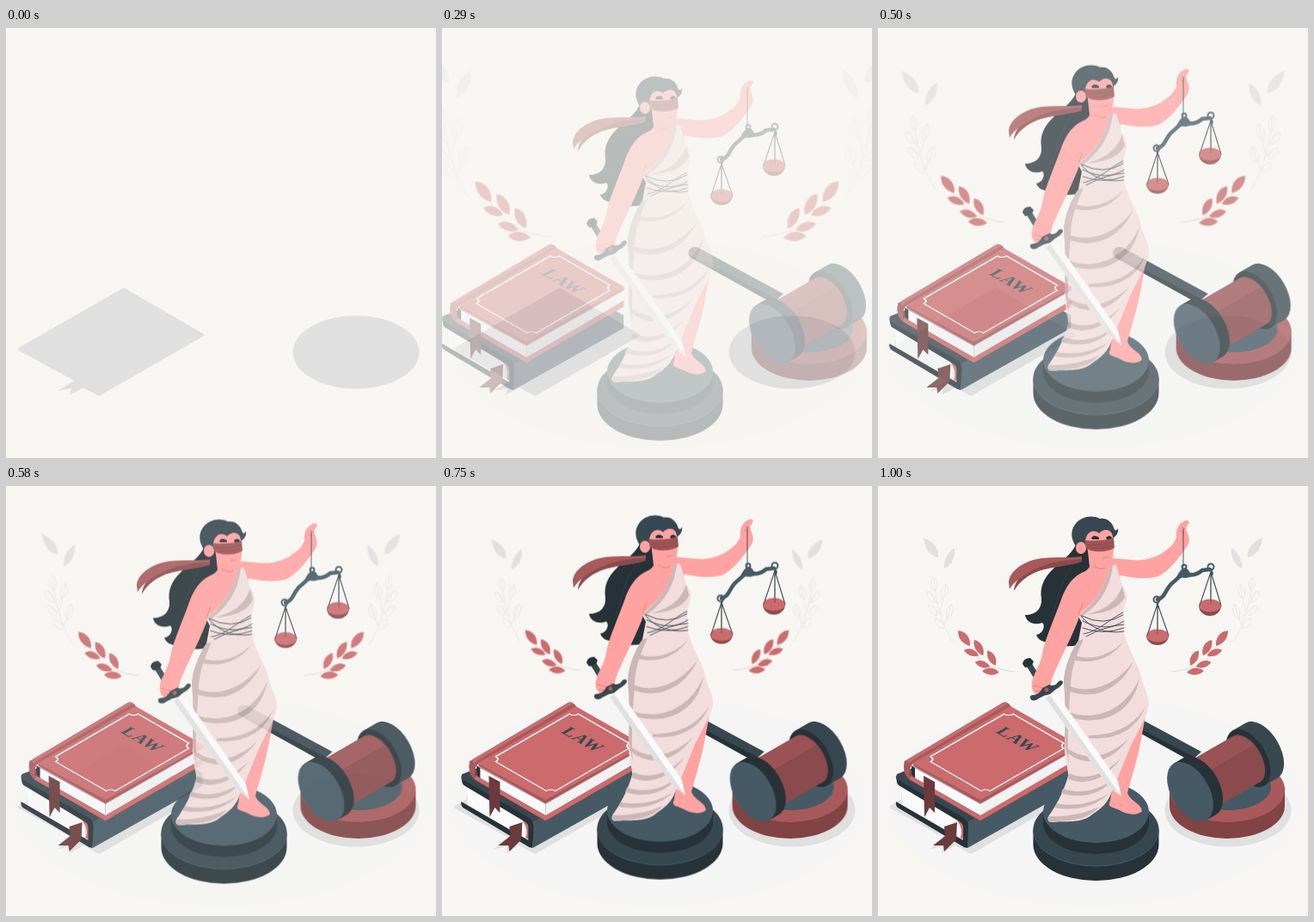
Write an HTML page that moves like this. It is 500 px wide and 500 px high and loops after 1.04 s.

```html
<!DOCTYPE html>
<html lang="en">
<head>
<meta charset="utf-8">
<title>Law and justice</title>
<style>
  html, body { margin: 0; width: 100%; height: 100%; overflow: hidden; background: #f7f6f2; }
  svg { display: block; width: 100vw; height: 100vh; }
  .in {
    animation: enter 1s cubic-bezier(.36, -.01, .5, 1.38) both paused;
    animation-delay: var(--clock, 0s);
  }
  #floor { --from: none; }
  #plants { --from: scale(1.5); transform-origin: 250px 139px; }
  #books { --from: translateX(-30px); }
  #gavel { --from: translateX(30px); }
  #justice { --from: translateY(30px); }
  @keyframes enter {
    from { opacity: 0; transform: var(--from); }
    to { opacity: 1; transform: none; }
  }
  .ink { fill: #263238; }
  .slate { fill: #37474f; }
  .steel { fill: #455a64; }
  .red { fill: #cb6b6d; }
  .brick { fill: #a85a5b; }
  .wine { fill: #8b4a4b; }
  .maroon { fill: #6b3a3c; }
  .skin { fill: #ffa3a2; }
  .dress { fill: #f2dddc; }
  .fold { fill: #cbb7b6; }
  .grey { fill: #e0e0e0; }
  .line { fill: none; stroke: #37474f; stroke-width: .9; stroke-linecap: round; }
  text { font: bold 20px "Liberation Serif", "Noto Serif", serif; letter-spacing: 1px; }
</style>
</head>
<body>
<svg viewBox="0 0 500 500">
  <defs>
    <path id="leaf" d="M-10 0C-5-6 4-6 10 0C4 5-4 5-10 0Z"/>
    <g id="sprig">
      <path class="grey" d="M53 60C63 64 72 73 70 83C60 81 54 72 53 60ZM89 72C90 82 86 92 77 96C76 86 81 77 89 72Z"/>
      <g fill="none" stroke="#e2e2e2" stroke-width=".7">
        <path d="M65 107C67 135 74 160 87 182M60 122L69 137M79 114Q77 130 72 146M62 139L74 151M85 137Q83 150 77 161"/>
        <use href="#leaf" transform="translate(65 114) rotate(82) scale(.85)"/>
        <use href="#leaf" transform="translate(61 129) rotate(55) scale(.75)"/>
        <use href="#leaf" transform="translate(77 123) rotate(105) scale(.9)"/>
        <use href="#leaf" transform="translate(64 145) rotate(50) scale(.75)"/>
        <use href="#leaf" transform="translate(83 146) rotate(106) scale(.9)"/>
        <use href="#leaf" transform="translate(71 160) rotate(50) scale(.75)"/>
      </g>
      <path d="M103 180C110 198 127 213 159 216" fill="none" stroke="#d9d4d2" stroke-width=".8"/>
      <g class="red">
        <use href="#leaf" transform="translate(100 177) rotate(52) scale(1.12)"/>
        <use href="#leaf" transform="translate(117 188) rotate(60) scale(1.05)"/>
        <use href="#leaf" transform="translate(132 200) rotate(62)"/>
        <use href="#leaf" transform="translate(108.500 194) rotate(20) scale(.92)"/>
        <use href="#leaf" transform="translate(121.500 207.500) rotate(18) scale(.92)"/>
        <use href="#leaf" transform="translate(131 216) rotate(4) scale(.98)"/>
      </g>
    </g>
  </defs>

  <ellipse id="floor" class="in" cx="250" cy="367" rx="240" ry="122" fill="#f5f5f5"/>

  <g class="grey">
    <path d="M14.500 372L135 303Q137 302 139 303L230 356Q231 357 230 358L110 427Q108 428 106 427L90 418L74 427L76 419L60 422L79 410L15 375Q13 373 14.500 372Z"/>
    <ellipse cx="407" cy="377" rx="73.500" ry="42.500"/>
  </g>

  <g id="plants" class="in">
    <use href="#sprig"/>
    <use href="#sprig" transform="translate(500) scale(-1 1)"/>
  </g>

  <g id="books" class="in">
    <!-- lower book -->
    <path fill="#e6e6e6" d="M27 342L104 386V412L27 369Z"/>
    <path fill="#fafafa" d="M27 347L95 387V411L29 373Z"/>
    <path class="red" d="M92 389L105 392V414L96 409Q100 399 92 389Z"/>
    <path class="slate" d="M22 335L40 328L217 322V331L105 392L24 346Q19 340 22 335Z"/>
    <path class="steel" d="M104 391L217 326L232 334V349L104 421Z"/>
    <path class="ink" d="M22 341L100 386Q106 390 105 398L104 420L99 418V396Q99 393 96 391L24 348Q21 345 22 341ZM21 367L101 413L104 421L100 420L23 374Q20 371 21 367Z"/>
    <path class="maroon" d="M77 396L92 391L91 411L77 425L76 418L64 418L78 407Z"/>
    <!-- upper book -->
    <path class="wine" d="M31 319Q28 334 36 341L119 390L232 324V317L118 381L43 338Z"/>
    <path class="red" d="M38 337L118 383L232 317V324L119 389L36 341Z"/>
    <path fill="#fafafa" d="M42 325L119 368V383L42 339Z"/>
    <path fill="#f2f2f2" d="M119 368L227 306V320L119 383Z"/>
    <path class="ink" d="M39 325L43 328V340L39 335Z"/>
    <path class="brick" d="M31 320L145 252Q149 250 153 254L155 257L42 322Q35 326 37 341Q28 336 31 320Z"/>
    <path class="red" d="M34 318L146 252Q149 251 151 253L40 319Q37 321 36 323Z"/>
    <path class="red" d="M154 256L231 300Q234 302 231 305L119 369L41 325V322Z"/>
    <path class="wine" d="M41 323L119 365L233 302Q234 304 231 306L119 370L41 327Z" opacity=".55"/>
    <g transform="matrix(.866 .5 -.866 .5 152 262)">
      <path d="M6 0H74Q74 6 80 6V105Q74 105 74 111H6Q6 105 0 105V6Q6 6 6 0Z" fill="none" stroke="#fff" stroke-width="1.500"/>
    </g>
    <text class="slate" transform="matrix(.866 .5 -.866 .5 136 286)">LAW</text>
    <path class="maroon" d="M53 337L66 344V380L60 374L54 385Z"/>
  </g>

  <g id="gavel" class="in">
    <path fill="#814344" d="M339 353V372A67 38 0 0 0 473 372V350Z"/>
    <ellipse class="brick" cx="406" cy="353" rx="67" ry="38"/>
    <ellipse class="steel" cx="408" cy="350" rx="49" ry="27"/>
    <path class="slate" d="M278 256L376 309L364 320L272 269Q264 266 266 259Q270 252 278 256Z"/>
    <path class="ink" d="M267 263L370 316L364 320L272 269Z"/>
    <g transform="translate(363 355.500) rotate(-30)">
      <path class="slate" d="M78-37H96a21 37 0 0 1 0 74H78Z"/>
      <ellipse class="ink" cx="78" rx="21" ry="37"/>
      <path class="wine" d="M16-31H76a17 31 0 0 1 0 62H16Z"/>
      <path fill="#995355" d="M16-31H76Q87-26 91-10H16Z"/>
      <path class="ink" d="M0-38H13a22 38 0 0 1 0 76H0Z"/>
      <ellipse class="steel" rx="22" ry="38"/>
    </g>
  </g>

  <g id="justice" class="in">
    <!-- pedestal -->
    <path class="ink" d="M180.500 400V417A73 42 0 0 0 326.500 417V400Z"/>
    <ellipse class="steel" cx="253.500" cy="401" rx="73" ry="41.500"/>
    <ellipse class="slate" cx="253.500" cy="400" rx="73" ry="41.500"/>
    <path class="ink" d="M192 379V392A61.500 36 0 0 0 315 392V379Z"/>
    <ellipse class="steel" cx="253.500" cy="379" rx="61.500" ry="36"/>

    <!-- hair -->
    <path class="ink" d="M232 60C231 76 215 85 204 96C192 107 188 119 190 131C191 142 184 150 171 150C172 157 180 163 191 159C195 162 192 172 184 173C187 181 196 183 205 181C212 187 228 189 241 181L246 110L250 80Z"/>
    <path class="slate" d="M272 61C277 59 280 54 279 49C277 53 275 52 274 48C271 40 264 37 258 38C248 33 235 36 229 45C223 53 225 63 230 70L244 76Z"/>
    <path class="line" d="M226 94C209 113 212 133 201 151" opacity=".7"/>

    <!-- head, chest and raised arm -->
    <path class="skin" d="M244 76L246 94C241 101 232 104 228 113L232 153L279 118L282 104C297 107 311 109 326 105C339 98 348 86 356 75C361 69 363 64 361 58L358 49L362 42Q360 38 354 42C349 45 346 52 347 60C345 67 338 73 329 79C317 85 308 87 296 86C286 85 274 84 267 84V78Z"/>
    <path class="skin" d="M241 64C242 55 249 49 257 55C264 48 272 51 273 59L274 76C273 85 271 91 265 91C257 91 249 86 245 78Z"/>
    <ellipse class="skin" cx="236" cy="72" rx="6" ry="7"/>
    <path class="ink" d="M248 60Q252 56 257 60V62H249ZM265 60Q269 56 272 60V62H266Z"/>
    <path class="brick" d="M237 82C222 84 206 82 190 84C169 87 153 99 152 112L153 120Q157 113 163 109Q159 114 158 122C165 110 174 104 186 99C204 93 223 93 237 88Z"/>
    <path class="wine" d="M237 85C216 86 190 88 163 109Q159 114 158 122C165 110 174 104 186 99C204 93 223 93 237 88Z"/>
    <path fill="#9e5355" d="M240 63C250 64 264 64 274 60L275 72C266 77 256 77 247 75L242 72Z"/>
    <path d="M244 68Q260 70 274 65M246 72Q260 74 274 69" fill="none" stroke="#8b4a4b" stroke-width=".7"/>
    <path d="M261 83Q265 84 268 82M251 93Q258 98 265 95M351 52L356 55M353 48L358 50" fill="none" stroke="#e87878" stroke-width=".9"/>

    <!-- leg and foot -->
    <path class="skin" d="M312 262L307 289C302 318 295 338 290 357C294 367 306 369 307 378C301 384 289 382 281 377C273 373 266 374 270 366L274 340L278 305Z"/>

    <!-- dress -->
    <path class="dress" d="M269 94L276 91C279 96 281 105 284 116C293 127 288 136 285 147L286 171C292 192 304 211 305 218C308 235 316 242 315 255C313 268 304 282 294 302C286 321 279 340 272 355C267 370 259 375 249 382C237 393 216 389 203 391C196 391 196 386 201 380C212 363 216 353 221 338C222 329 216 318 217 298C218 273 218 245 216 229C216 211 225 191 233 180L237 159L232 150C250 138 264 119 269 94Z"/>
    <g class="fold">
      <path d="M233 180C225 191 216 211 216 229C218 245 218 273 217 298L222 323C219 286 223 252 224 231C225 211 231 196 239 178Z"/>
      <path d="M269 94L273 92C270 119 257 138 238 151L233 151C250 138 264 119 269 94Z"/>
      <path d="M284 116C278 133 266 144 243 149C263 149 281 142 287 129Z"/>
      <path d="M229 197C248 204 272 196 286 180C272 201 249 208 226 202Z"/>
      <path d="M221 232C246 243 276 232 297 204C280 240 247 249 221 238Z"/>
      <path d="M222 263C255 275 290 258 304 223C297 266 256 281 222 268Z"/>
      <path d="M245 290C278 290 300 276 311 256C301 284 275 296 245 293Z"/>
      <path d="M218 303C238 321 268 317 292 293C270 325 238 327 219 309Z"/>
      <path d="M222 334C242 343 262 336 282 317C263 343 240 349 220 340Z"/>
      <path d="M215 352C236 359 258 354 275 339C258 361 234 364 213 357Z"/>
      <path d="M208 369C230 373 250 369 269 357C251 375 227 378 205 374Z"/>
      <path d="M199 384C221 385 242 380 257 373C242 391 220 388 203 391Q196 390 199 384Z"/>
    </g>
    <path class="line" d="M237 151Q262 164 285 150M238 157Q266 171 286 157M238 165Q262 174 286 165M239 172C257 169 270 154 285 147M236 151C249 168 269 172 286 169M242 175Q264 163 286 161"/>

    <!-- sword and lowered arm -->
    <path fill="#fafafa" d="M195 247L206 239L279 343L283 361L268 349Z"/>
    <path class="grey" d="M195 247L200 243L283 361L268 349Z"/>
    <path d="M174 205L195 239" stroke="#37474f" stroke-width="7" fill="none"/>
    <path class="ink" d="M168 207Q169 200 177 200L181 204Q179 211 171 211Z"/>
    <path class="skin" d="M247 97C229 102 220 113 213 132C204 157 196 174 192 190C190 203 186 211 181 221C177 231 178 242 187 243C196 243 201 235 202 225C208 208 222 183 232 158L242 128Z"/>
    <path d="M181 232L191 235M183 238L191 239M233 149Q236 142 238 137" fill="none" stroke="#e87878" stroke-width=".9"/>
    <path class="slate" d="M177 247Q176 243 181 243Q188 242 191 235L199 231Q206 234 210 227Q215 225 215 229Q213 233 206 237L200 242Q193 243 187 247Q180 252 177 247Z"/>
    <circle class="brick" cx="196" cy="237" r="2.500"/>

    <!-- scales -->
    <path class="line" d="M355 50V94M325 137L313 174M325 137V168M325 137L338 174M387 100L374 139M387 100V133M387 100L399 139"/>
    <path d="M325 132C334 130 334 120 342 113C350 107 352 102 358 102C365 104 370 104 377 98L386 97" fill="none" stroke="#455a64" stroke-width="4.500" stroke-linecap="round"/>
    <path class="steel" d="M347 106Q352 96 355 96Q360 94 363 102L370 104L358 107Z"/>
    <g fill="none" stroke="#455a64" stroke-width="2">
      <circle cx="324" cy="132" r="3.500"/>
      <circle cx="387" cy="94" r="3.500"/>
      <circle cx="356" cy="94" r="2.500"/>
      <path d="M326 135Q323 140 327 141M387 98Q391 102 387 104"/>
    </g>
    <path class="wine" d="M312 174A13 11 0 0 0 338 174ZM373 139A13 12 0 0 0 399 139Z"/>
    <g class="red">
      <ellipse cx="325" cy="174" rx="13" ry="7.500"/>
      <ellipse cx="386" cy="139" rx="13" ry="7.500"/>
    </g>
    <path class="line" d="M325 137L313 174M325 137V172M325 137L338 174M387 100L374 139M387 100V137M387 100L399 139" opacity=".7"/>
  </g>
</svg>
<script>
  // The CSS animations stay paused; a 24 fps clock moves them along.
  const LOOP = 1040, FPS = 24, HOLD = 3;
  const start = performance.now();

  function tick() {
    const time = (performance.now() - start) % LOOP;
    const step = Math.min(FPS, Math.floor((time + 3.4) * FPS / 1000));
    const shown = step < HOLD ? 0 : step / FPS;
    document.documentElement.style.setProperty('--clock', `${-shown}s`);
    requestAnimationFrame(tick);
  }
  tick();
</script>
</body>
</html>
```
